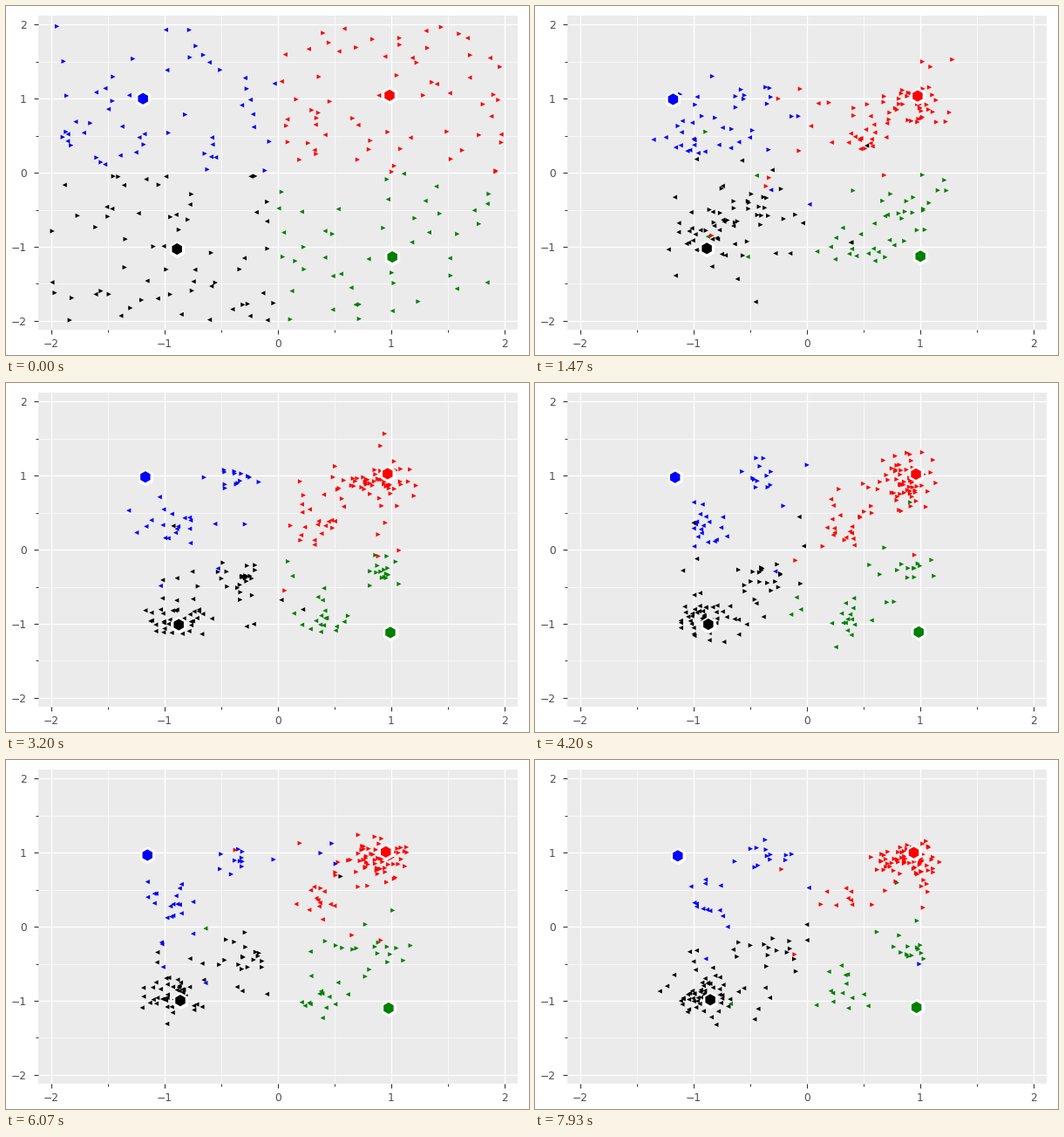
Recreate the animation shown at these times as a matplotlib script. Size 600 by 400 pixels, loop 8000 ms.

```python
import numpy as np
import matplotlib.pyplot as plt
from matplotlib.animation import FuncAnimation
from matplotlib.colors import to_rgba_array
from matplotlib.ticker import MultipleLocator

FRAMES, LOOP = 120, 8000
COLORS = to_rgba_array(["blue", "red", "black", "green"])
SIGNS = np.array([(-1, 1), (1, 1), (-1, -1), (1, -1)])
COUNTS = (52, 66, 62, 45)
LEADERS = np.array([(-1.19, 1.0), (0.985, 1.045), (-0.89, -1.03), (1.01, -1.137)])
SHRINK = 0.043  # share of the way leaders drift to the middle

# Left pointers lean to the lower left corner, right pointers to the upper right
LEAN = np.array([-1, 1])
CENTERS = 0.64 * SIGNS + 0.29 * LEAN[:, None, None]
JOIN = np.exp(0.9 * LEAN[:, None] * SIGNS.sum(axis=1))
JOIN /= JOIN.sum(axis=1, keepdims=True)
SWITCH, NOISE = 0.008, 0.044


def simulate(seed=12):
    """Agents settle near the center of their party and now and then change party."""
    rng = np.random.default_rng(seed)
    party = np.repeat(np.arange(4), COUNTS)
    n = len(party)
    kind = rng.integers(0, 2, n)
    pull = rng.uniform(0.03, 0.1, (n, 1))
    pos = SIGNS[party] * rng.uniform(0, 2, (n, 2))
    odds = JOIN.cumsum(axis=1)[kind]
    steps = [(pos, party)]
    for _ in range(FRAMES - 1):
        pick = (rng.random((n, 1)) > odds[:, :3]).sum(axis=1)
        party = np.where(rng.random(n) < SWITCH, pick, party)
        pos = pos + pull * (CENTERS[kind, party] - pos) + rng.normal(0, NOISE, (n, 2))
        steps.append((pos, party))
    return kind, steps


def make_axes(fig):
    ax = fig.add_axes([36.9 / 600, 29.2 / 400, 550 / 600, 359.4 / 400], facecolor="#EBEBEB")
    ax.set(xlim=(-2.115, 2.115), ylim=(-2.117, 2.117))
    ax.set_axisbelow(True)
    ax.spines[:].set_visible(False)
    for axis, pad in ((ax.xaxis, 3.6), (ax.yaxis, 5.8)):
        axis.set_major_locator(MultipleLocator(1))
        axis.set_minor_locator(MultipleLocator(0.5))
        axis.set_major_formatter(lambda v, _: f"{v:.0f}".replace("-", "\u2212"))
        axis.set_tick_params(which="major", length=3.6, width=0.8, pad=pad,
                             color="#333333", labelcolor="#4D4D4D", labelsize=8.8)
        axis.set_tick_params(which="minor", length=2, width=0.7, color="#333333")
        axis.grid(True, which="major", color="white", lw=1)
        axis.grid(True, which="minor", color="white", lw=0.5)
    return ax


plt.rcParams["font.family"] = "DejaVu Sans"
kind, steps = simulate()
fig = plt.figure(figsize=(6, 4), dpi=100, facecolor="white")
ax = make_axes(fig)

flocks = [ax.scatter([], [], s=14, marker=m, linewidths=0, zorder=3) for m in "<>"]
halos = ax.scatter(*LEADERS.T, s=205, marker="h", c="white", linewidths=0, zorder=4)
leaders = ax.scatter(*LEADERS.T, s=91, marker="h", c=COLORS, linewidths=0, zorder=5)


def update(i):
    pos, party = steps[i]
    for k, flock in enumerate(flocks):
        flock.set_offsets(pos[kind == k])
        flock.set_facecolors(COLORS[party[kind == k]])
    place = LEADERS * (1 - SHRINK * i / (FRAMES - 1))
    halos.set_offsets(place)
    leaders.set_offsets(place)
    return *flocks, halos, leaders


anim = FuncAnimation(fig, update, frames=FRAMES, init_func=lambda: update(0),
                     interval=LOOP / FRAMES, repeat=True, repeat_delay=0)
plt.show()
```
